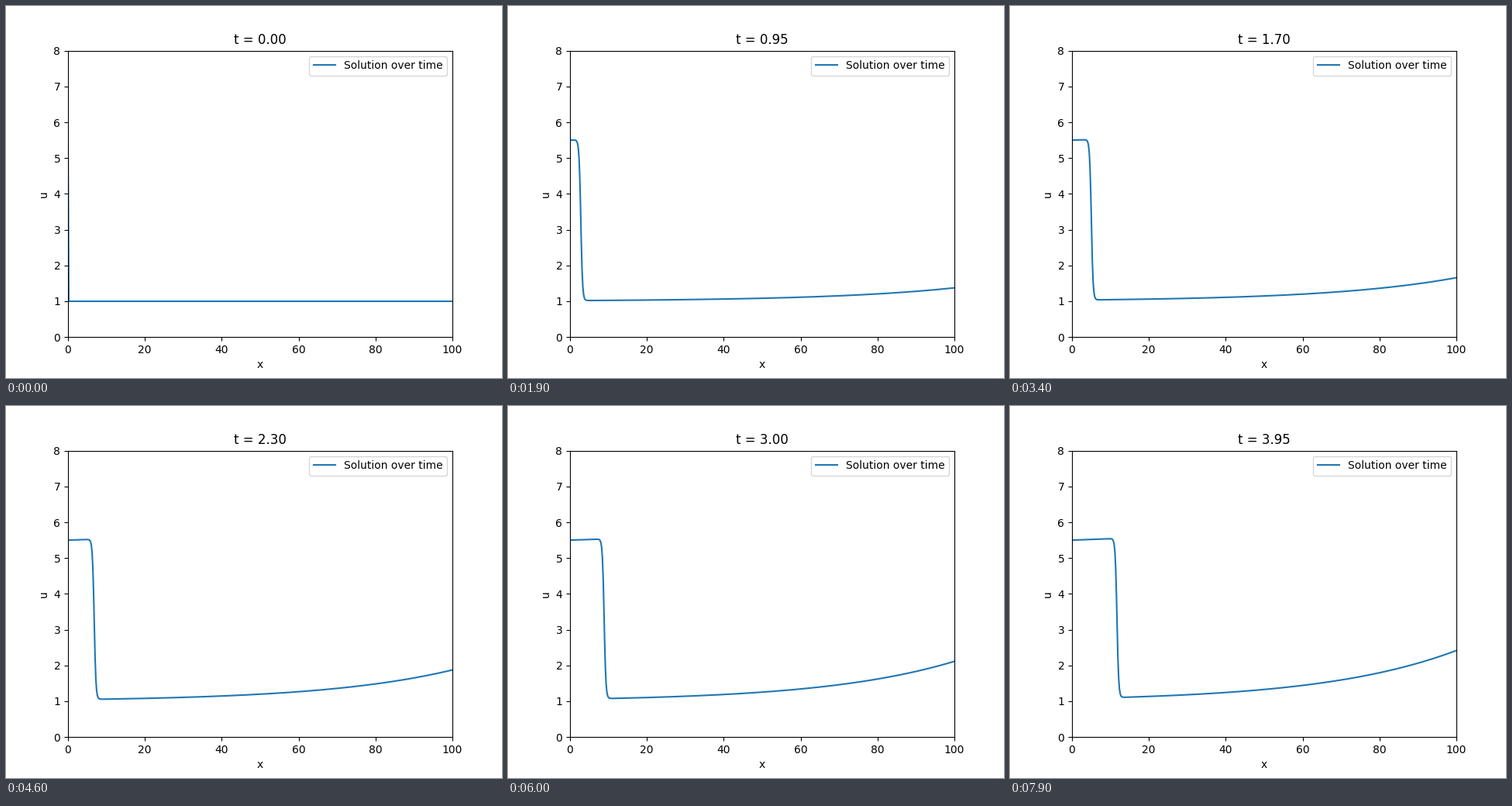
Animation of 640x480 px, one loop 8 s. Source, as a matplotlib script:

```python
import numpy as np
import matplotlib.pyplot as plt
from matplotlib.animation import FuncAnimation

FRAMES, INTERVAL, DT = 80, 100, 0.05
U_IN, U_0 = 5.5, 1.0          # inflow value and initial state
AMP, RATE = 0.02, 0.03        # source term AMP * exp(RATE * x)
SPEED, WIDTH = 2.96, 0.45     # travelling front
SUBSTEPS = 10

x = np.linspace(0, 100, 512)


def source(pos):
    return AMP * np.exp(RATE * pos)


def ahead_states():
    """Undisturbed solution for every frame, by characteristics."""
    pos, u = x.copy(), np.full_like(x, U_0)
    h = DT / SUBSTEPS
    states = []
    for _ in range(FRAMES):
        states.append(np.interp(x, pos, u))
        for _ in range(SUBSTEPS):
            mid = pos + u * h / 2
            kick = h * source(mid)
            pos = pos + h * (u + kick / 2)
            u = u + kick
    return states


behind = np.sqrt(U_IN**2 + 2 * AMP / RATE * (np.exp(RATE * x) - 1))
ahead = ahead_states()


def solution(i):
    t = i * DT
    if i == 0:
        u = ahead[0].copy()
    else:
        width = WIDTH * (1 - np.exp(-6 * t))
        mix = 0.5 * (1 - np.tanh((x - SPEED * t) / width))
        u = ahead[i] + (behind - ahead[i]) * mix
    u[0] = U_IN
    return u


fig, ax = plt.subplots(figsize=(6.4, 4.8), dpi=100)
line, = ax.plot(x, solution(0), label="Solution over time")
ax.set(xlim=(0, 100), ylim=(0, 8), xlabel="x", ylabel="u")
title = ax.set_title("t = 0.00")
ax.legend(loc="upper right")


def update(i):
    line.set_ydata(solution(i))
    title.set_text(f"t = {i * DT:.2f}")
    return line, title


anim = FuncAnimation(fig, update, frames=FRAMES, interval=INTERVAL,
                     repeat=True, repeat_delay=0)
plt.show()
```
